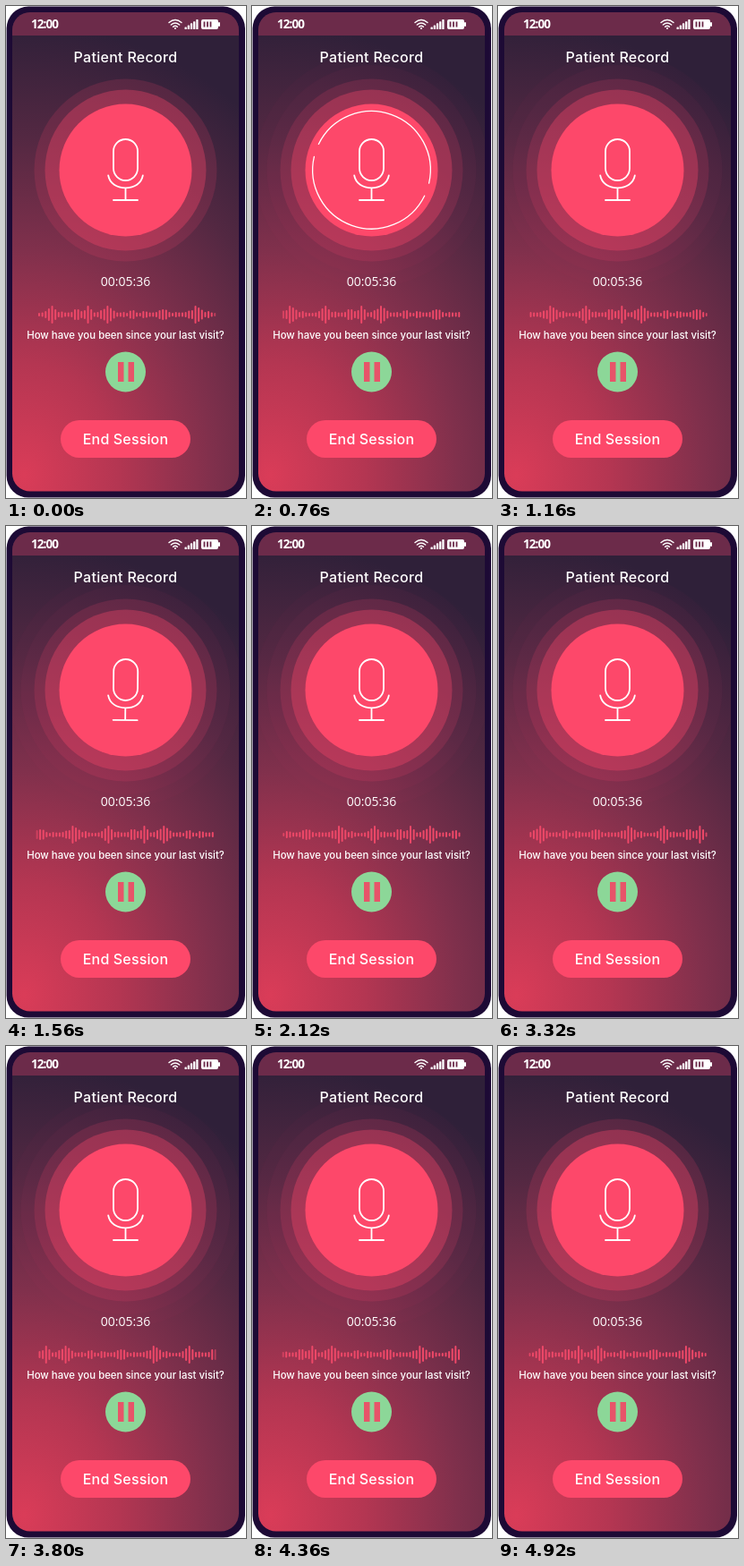
These frames come from a looping animation (268x550 px, 4960 ms). An HTML page:

```html
<!DOCTYPE html>
<html lang="en">
<head>
<meta charset="utf-8">
<title>Patient Record</title>
<style>
  html, body { margin: 0; width: 100%; height: 100%; overflow: hidden; background: #fff; }
  svg { display: block; width: 268px; height: 550px; }
  text { fill: #fff; text-anchor: middle; font-family: Inter, sans-serif; font-weight: 500; }
  .digits { font-family: "Open Sans", "Noto Sans", sans-serif; }
  .line { fill: none; stroke: #fff; stroke-linecap: round; }
</style>
</head>
<body>
<svg viewBox="0 0 268 550">
  <defs>
    <radialGradient id="bg" gradientUnits="userSpaceOnUse" cx="0" cy="0" r="1"
        gradientTransform="translate(20 525) scale(420 505)">
      <stop offset="0" stop-color="#da3c58"/>
      <stop offset=".25" stop-color="#b43652"/>
      <stop offset=".5" stop-color="#80304c"/>
      <stop offset=".75" stop-color="#532842"/>
      <stop offset="1" stop-color="#2f2039"/>
    </radialGradient>
    <linearGradient id="edge">
      <stop offset="0" stop-color="#000"/>
      <stop offset=".02" stop-color="#fff"/>
      <stop offset=".98" stop-color="#fff"/>
      <stop offset="1" stop-color="#000"/>
    </linearGradient>
    <mask id="fade" maskUnits="userSpaceOnUse" x="32" y="330" width="204" height="30">
      <rect x="32" y="330" width="204" height="30" fill="url(#edge)"/>
    </mask>
    <clipPath id="screen"><rect x="7" y="7" width="253" height="535.5" rx="20"/></clipPath>
  </defs>

  <rect x=".6" y=".6" width="266.4" height="549" rx="24.5" fill="#1d0a35"/>
  <g clip-path="url(#screen)">
    <rect x="7" y="7" width="253" height="536" fill="url(#bg)"/>
    <rect x="7" y="7" width="253" height="26" fill="#6c2b4a"/>
    <g id="halo" fill="#fd486a">
      <circle cx="133.5" cy="183" r="117" fill-opacity=".035"/>
      <circle cx="133.5" cy="183" r="131" fill-opacity=".02"/>
    </g>
  </g>

  <text class="digits" x="43" y="25" font-size="13.5" style="font-weight:700" letter-spacing="-.9">12:00</text>
  <path class="line" stroke-width="1.4"
    d="M182 18.5Q189 12.5 196 18.5M184.3 21Q189 17 193.7 21M186.6 23.3Q189 21.2 191.4 23.3"/>
  <circle cx="189" cy="25" r="1.1" fill="#fff"/>
  <g id="signal" fill="#fff"></g>
  <rect x="218" y="15" width="19" height="11" rx="2" fill="#fff"/>
  <rect x="237" y="18" width="2" height="5" rx="1" fill="#fff"/>
  <path d="M221.5 17.5v6M225 17.5v6M228.5 17.5v6" stroke="#6c2b4a" stroke-width="1.8"/>

  <text x="133.5" y="63" font-size="16" letter-spacing=".3">Patient Record</text>

  <g fill="#fd486a">
    <circle cx="133.5" cy="183.5" r="102" fill-opacity=".15"/>
    <circle cx="133.5" cy="183.5" r="90" fill-opacity=".34"/>
    <circle cx="133.5" cy="183.5" r="74"/>
  </g>
  <g id="arcs" class="line" stroke-width="1.3"><path/><path/></g>
  <g id="mic" class="line" stroke-width="1.8">
    <rect x="120" y="149" width="27" height="46" rx="13.5"/>
    <path d="M114.2 189.5C116 198.5 123.5 203.3 133.5 203.3S151 198.5 152.8 189.5M133.5 203.3V217M120 217H147"/>
  </g>

  <text class="digits" x="133.5" y="313" font-size="14">00:05:36</text>
  <g mask="url(#fade)"><g id="wave" fill="#ee4868"></g></g>
  <text x="133.5" y="372" font-size="11.4">How have you been since your last visit?</text>

  <circle cx="133.5" cy="409" r="22.5" fill="#8cd798"/>
  <path d="M125 398h6.5v22H125zM136.5 398h6.5v22h-6.5z" fill="#e75469"/>
  <rect x="61" y="463" width="145" height="42" rx="21" fill="#fd486a"/>
  <text x="133.5" y="489.5" font-size="16" letter-spacing=".15">End Session</text>
</svg>
<script>
const LOOP = 4960, SPAN = 200, CX = 133.5, CY = 183.3, R = 65.8;
const heights = [
  20, 16, 11, 6, 8, 5, 4, 4, 5, 8, 14,
  20, 12, 6, 7, 5, 5, 6, 12, 12, 8, 10,
  20, 12, 5, 6, 10, 13,
  20, 15, 9, 5, 5, 6, 4, 9, 10, 5, 4, 8, 7, 5, 5, 6, 10, 12, 11, 6, 4, 6, 5, 5, 6, 9, 10
];
const $ = id => document.getElementById(id);
const clamp = v => Math.max(0, Math.min(1, v));
const ease = v => (1 - Math.cos(Math.PI * clamp(v))) / 2;

function addRect(parent, x, y, w, h, rx) {
  const r = document.createElementNS("http://www.w3.org/2000/svg", "rect");
  Object.entries({ x, y, width: w, height: h, rx }).forEach(([k, v]) => r.setAttribute(k, v));
  return parent.appendChild(r);
}

for (let i = 0; i < 5; i++) addRect($("signal"), 199.5 + i * 3.2, 23.5 - i * 2.1, 2.3, 2.5 + i * 2.1, .6);
const bars = heights.map(h => addRect($("wave"), 0, 345 - h / 2, 2, h, 1));
const arcs = [...$("arcs").children];

function point(deg) {
  const a = deg * Math.PI / 180;
  return `${CX + R * Math.cos(a)} ${CY + R * Math.sin(a)}`;
}

function drawArcs(t) {
  const head = 167 * ease((t - 420) / 330);
  const tail = 167 * ease((t - 780) / 330);
  const start = 26 + (t - 760) * .03;
  arcs.forEach((arc, i) => {
    const a = start + i * 180;
    arc.setAttribute("d", head - tail > .5
      ? `M${point(a + tail)}A${R} ${R} 0 0 1 ${point(a + head)}` : "");
  });
}

function draw(now) {
  const t = now % LOOP;
  bars.forEach((bar, i) => {
    const x = (177.5 + i * SPAN / bars.length + t / LOOP * SPAN) % SPAN;
    bar.setAttribute("x", 33 + x);
  });
  $("halo").setAttribute("opacity", ease(t / 600) * ease((LOOP - 40 - t) / 500));
  drawArcs(t);
  const w = clamp((t - 1200) / 800);
  const tilt = 4 * (1 - w) * Math.sin(w * Math.PI * 4 + .9 * Math.sin(w * Math.PI));
  $("mic").setAttribute("transform", `rotate(${tilt} ${CX} ${CY})`);
}

const begin = performance.now();
(function tick() {
  draw(performance.now() - begin);
  requestAnimationFrame(tick);
})();
</script>
</body>
</html>
```
